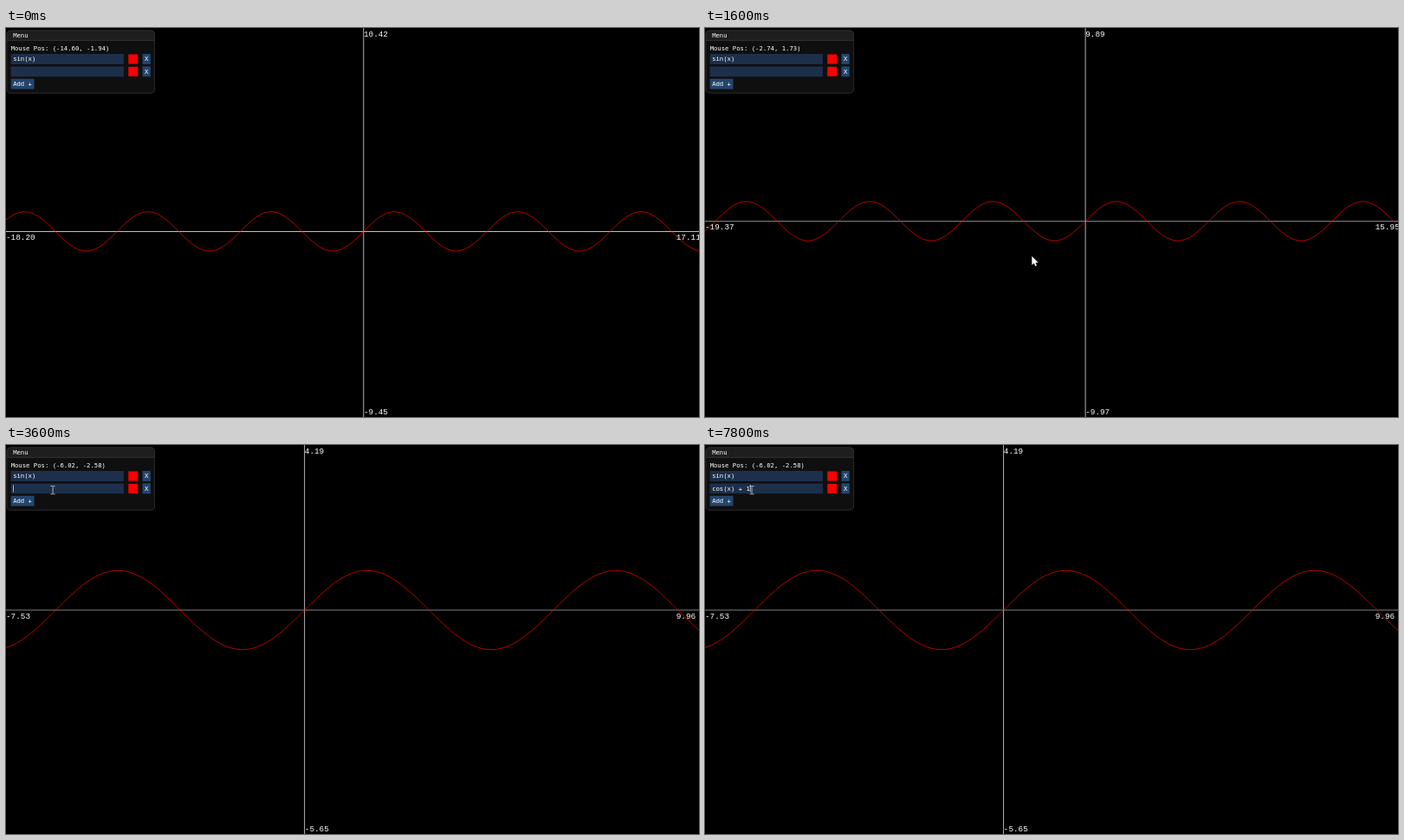
These frames come from a looping animation (800x450 px, 8 s). An HTML page with a canvas:

```html
<!DOCTYPE html>
<html lang="en">
<head>
<meta charset="utf-8">
<title>Function plotter</title>
<style>
  html, body { margin: 0; width: 100%; height: 100%; overflow: hidden; background: #000; }
  canvas { display: block; }
</style>
</head>
<body>
<canvas id="stage" width="800" height="450"></canvas>
<script>
const WIDTH = 800, HEIGHT = 450, LOOP = 8000, STEP = 100;
const UNIT = 0.625; // the scene is laid out on a 1280 x 720 grid
const ctx = document.getElementById("stage").getContext("2d");

const START = { ox: 412.33, oy: 235.95, scale: 22.653, mx: 81.6, my: 192 };
// The pointer travels from point to point, dragging the plane or zooming about the centre.
const MOVES = [
  { from: 300, to: 600, point: [350.3, 275.1] },
  { from: 600, to: 1300, point: [286.8, 282], drag: true },
  { from: 1300, to: 1600, point: [376.75, 263.3], drag: true },
  { from: 1600, to: 2000, point: [487.5, 285.3], zoom: 3.5386 },
  { from: 2000, to: 2600, point: [567.9, 280.9], zoom: 0.57036 },
  { from: 2600, to: 2800, point: [434.1, 249.2], drag: true },
  { from: 2800, to: 3000, point: [69.2, 73.6] }
];
const POINTER_SHOWN = 300, MENU_ENTERED = 3100, INPUT_FOCUSED = 3300;

const KEY_GAP = 300;
const BURSTS = [
  { at: 4000, keys: "co" },
  { at: 4900, keys: "s(x" },
  { at: 6000, keys: ") + " },
  { at: 7800, keys: "1" }
];

function stateAt(t) {
  const s = { ...START };
  for (const { from, to, point, drag, zoom = 1 } of MOVES) {
    if (t < from) break;
    const k = Math.min(1, (t - from) / (to - from));
    const dx = (point[0] - s.mx) * k, dy = (point[1] - s.my) * k;
    s.mx += dx;
    s.my += dy;
    if (drag) {
      s.ox += dx;
      s.oy += dy;
    }
    const factor = zoom ** k;
    s.scale *= factor;
    s.ox = WIDTH / 2 + (s.ox - WIDTH / 2) * factor;
    s.oy = HEIGHT / 2 + (s.oy - HEIGHT / 2) * factor;
  }
  return s;
}

function typedAt(t) {
  return BURSTS.map(({ at, keys }) =>
    keys.slice(0, Math.max(0, Math.floor((t - at) / KEY_GAP) + 1))).join("");
}

function box(x, y, w, h, color, radius = 0) {
  ctx.fillStyle = color;
  ctx.beginPath();
  ctx.roundRect(x, y, w, h, radius);
  ctx.fill();
}

function text(str, x, y) {
  ctx.fillStyle = "#fff";
  ctx.fillText(str, x, y);
}

function drawGraph({ ox, oy, scale }) {
  const axisX = Math.round(ox / UNIT) * UNIT;
  const axisY = Math.floor(oy / UNIT - 1) * UNIT;
  box(axisX, 0, 0.7, HEIGHT, "#fff");
  box(0, axisY, WIDTH, 0.7, "#fff");

  ctx.strokeStyle = "#f00";
  ctx.lineWidth = 0.7;
  ctx.beginPath();
  for (let x = 0; x <= WIDTH; x++) {
    ctx.lineTo(x, axisY + UNIT / 2 - Math.sin((x - axisX - UNIT / 2) / scale) * scale);
  }
  ctx.stroke();

  ctx.font = "9.375px 'Liberation Mono', monospace";
  text((-ox / scale).toFixed(2), 0, axisY + 10);
  text(((WIDTH - ox) / scale).toFixed(2), 773.75, axisY + 10);
  text((oy / scale).toFixed(2), axisX + 0.4, 9.8);
  text(((oy - HEIGHT) / scale).toFixed(2), axisX + 0.4, 447);
}

function drawRow(y, formula) {
  box(8, y, 208.5, 19, "#1d2f4b");
  box(225, y + 0.8, 17.6, 17.6, "#f00");
  box(251, y, 15, 19, "#23456d");
  text(formula, 12, y + 13);
  text("X", 255, y + 13);
}

function drawMenu({ ox, oy, scale, mx, my }, t) {
  const typed = typedAt(t);
  ctx.font = "11.63px 'DejaVu Sans Mono', monospace";
  box(0.5, 4.5, 273, 116, "#0f0f0f", 7);
  box(0.5, 4.5, 273, 18.5, "#1e1e1e", [7, 7, 0, 0]);
  ctx.strokeStyle = "#404046";
  ctx.lineWidth = 1;
  ctx.beginPath();
  ctx.roundRect(0.5, 4.5, 273, 116, 7);
  ctx.moveTo(1, 23);
  ctx.lineTo(273, 23);
  ctx.stroke();

  text("Menu", 12, 17);
  const pos = [(mx - ox) / scale, (my - oy) / scale].map(v => v.toFixed(2));
  text(`Mouse Pos: (${pos.join(", ")})`, 8, 41);
  drawRow(48, "sin(x)");
  drawRow(71, typed);
  box(8, 94, 43, 19, "#23456d");
  text("Add +", 12, 107);
  if (t >= INPUT_FOCUSED) box(12 + 7 * typed.length, 74, 1, 13, "#fff");
}

function drawArrow(x, y) {
  const arrow = new Path2D("M0 0V16.5L3.8 13L6.3 18.7L9 17.5L6.5 12H11.8Z");
  ctx.translate(x, y);
  ctx.lineWidth = 1.5;
  ctx.strokeStyle = "#000";
  ctx.stroke(arrow);
  ctx.fillStyle = "#fff";
  ctx.fill(arrow);
}

function drawTextCursor(x, y) {
  ctx.strokeStyle = "#ddd";
  ctx.lineWidth = 1.2;
  ctx.translate(x, y);
  ctx.stroke(new Path2D("M-4 -7.5H-1L0 -6.5L1 -7.5H4M0 -6.5V6.5M-4 7.5H-1L0 6.5L1 7.5H4"));
}

function draw(now) {
  const t = Math.floor((now % LOOP) / STEP) * STEP;
  const state = stateAt(t);
  box(0, 0, WIDTH, HEIGHT, "#000");
  drawGraph(state);
  ctx.save();
  ctx.scale(UNIT, UNIT);
  ctx.translate(1, 0);
  drawMenu(state, t);
  if (t >= MENU_ENTERED) drawTextCursor(85.5, 83.5);
  else if (t >= POINTER_SHOWN) drawArrow(state.mx / UNIT, state.my / UNIT + 1);
  ctx.restore();
}

const start = performance.now();
function tick() {
  draw(performance.now() - start);
  requestAnimationFrame(tick);
}
tick();
</script>
</body>
</html>
```
